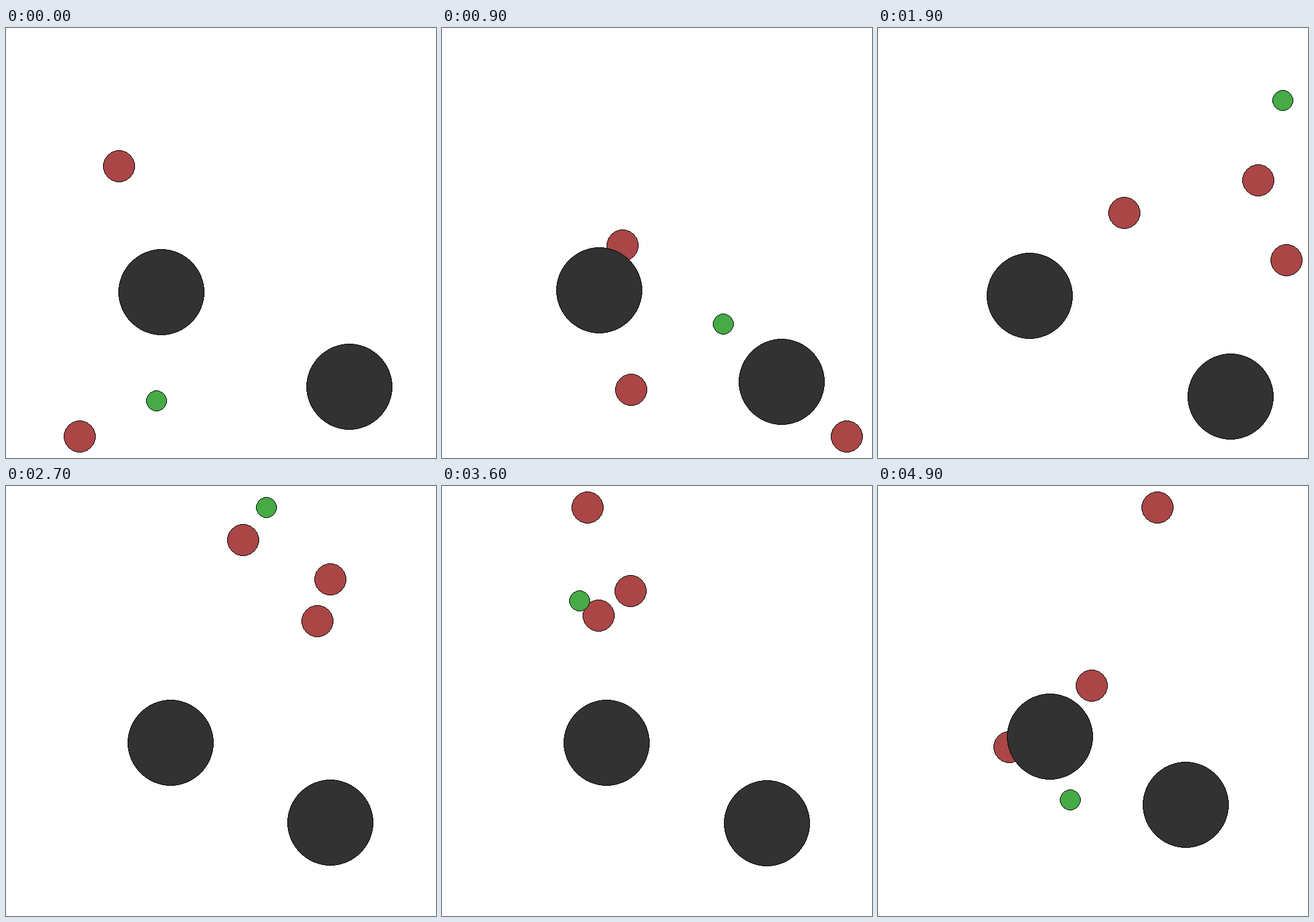
Animation, 700 px wide and 700 px high, one loop 5000 ms. Source, as an HTML page with a canvas:

```html
<!DOCTYPE html>
<html lang="en">
<head>
<meta charset="utf-8">
<title>Chase</title>
<style>
  html, body { margin: 0; width: 100%; height: 100%; overflow: hidden; background: #fff; }
  canvas { display: block; width: 100vw; height: 100vh; image-rendering: pixelated; }
</style>
</head>
<body>
<canvas id="stage" width="700" height="700"></canvas>
<script>
const STEP = 100, STEPS = 50, MID = 350, REACH = 315;
const ctx = document.getElementById('stage').getContext('2d');

const hunter = { r: 26, color: 'rgb(170, 70, 70)' };
const runner = { r: 17, color: 'rgb(70, 170, 70)' };
const rock = { r: 70, color: 'rgb(50, 50, 50)' };

// Steps at which the movers reach the key points of their paths
const keys = [0, 9, 12, 19, 27, 36, 42, 49];

// Later bodies cover earlier ones
const bodies = [
  { ...hunter,
    x: [-165.5, -57.3, 20, 252, 210.3, -49.8, -141.8, -187.6],
    y: [-124.5, 4.6, -51, -94.9, -232.7, -209.2, -89.4, 104.5] },
  { ...hunter,
    x: [-229.5, -42.8, 0, 48.2, 43, -131.9, -46.9, 146.1],
    y: [315, 247.2, 170, -45.3, -308, -369.2, -382.9, -436.1] },
  { ...hunter,
    x: [220, 319.4, 309, 294.5, 185.5, -110.8, -98, -2.1],
    y: [243, 325.1, 252, 26.6, -152.6, -162.3, -21.3, -33.9] },
  { ...runner,
    x: [-104.5, 112, 175, 289.4, 87.8, -147, -207.5, -50.5],
    y: [257.5, 136.7, 40, -216.5, -371.1, -190.5, 49.3, 223.6] },
  { ...rock, x: [-96.1], y: [80.45] },
  { ...rock, x: [209.9], y: [234.2] }
];

function slope(p, i) {
  const a = Math.max(i - 1, 0), b = Math.min(i + 1, keys.length - 1);
  return (p[b] - p[a]) / (keys[b] - keys[a]);
}

// Smooth cubic through the key points
function along(p, n) {
  if (p.length === 1) return p[0];
  let i = 0;
  while (i < keys.length - 2 && n >= keys[i + 1]) i++;
  const span = keys[i + 1] - keys[i];
  const u = (n - keys[i]) / span, v = 1 - u;
  return p[i] * v * v * (1 + 2 * u) + p[i + 1] * u * u * (3 - 2 * u)
    + span * u * v * (slope(p, i) * v - slope(p, i + 1) * u);
}

// Midpoint circle: half widths and heights of its rim pixels
function rim(r) {
  const points = [];
  let x = 0, y = r, f = 1 - r;
  while (x < y) {
    if (f >= 0) {
      y--;
      f -= 2 * y;
    }
    x++;
    f += 2 * x + 1;
    points.push([x, y], [y, x]);
  }
  return points;
}

function disc(cx, cy, r, color) {
  const points = rim(r);
  ctx.fillStyle = color;
  for (const [w, h] of points) {
    ctx.fillRect(cx - w, cy - h, 2 * w, 1);
    ctx.fillRect(cx - w, cy + h - 1, 2 * w, 1);
  }
  ctx.fillStyle = '#000';
  for (const [w, h] of points)
    for (const px of [cx - w, cx + w - 1])
      for (const py of [cy - h, cy + h - 1])
        ctx.fillRect(px, py, 1, 1);
}

// The camera zooms so that the outermost body always sits at REACH
function draw(n) {
  const places = bodies.map(b => [along(b.x, n), along(b.y, n)]);
  const zoom = REACH / Math.max(...places.flat().map(Math.abs));
  const toPx = v => Math.floor(MID + v * zoom + 1e-6);
  ctx.clearRect(0, 0, 700, 700);
  bodies.forEach((b, i) => disc(...places[i].map(toPx), b.r, b.color));
}

const start = performance.now();
function tick() {
  draw(Math.floor((performance.now() - start) / STEP) % STEPS);
  requestAnimationFrame(tick);
}
tick();
</script>
</body>
</html>
```
